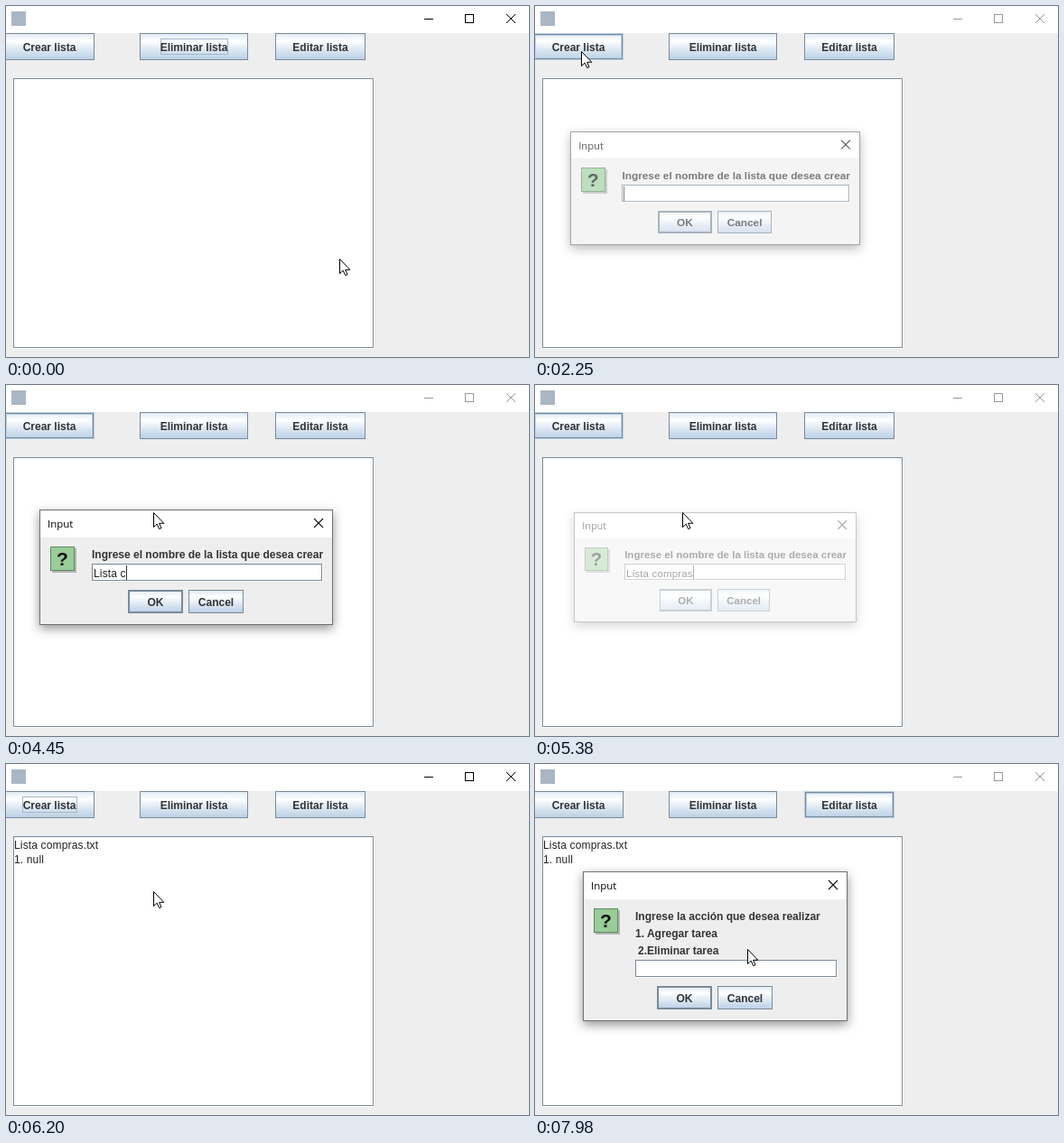
Animation, 579 px wide and 389 px high, one loop 8000 ms. Source, as an HTML page:

```html
<!DOCTYPE html>
<html lang="es">
<head>
<meta charset="utf-8">
<title>Listas</title>
<style>
html, body { margin: 0; width: 100%; height: 100%; overflow: hidden; background: #eee; }
svg { display: block; width: 579px; height: 389px; }
rect, line { shape-rendering: crispEdges; }
text { font: bold 12px "Liberation Sans", Arial, sans-serif; fill: #333; white-space: pre; }
.mid { text-anchor: middle; }
.plain { font-weight: normal; letter-spacing: .15px; fill: #222; }
.title { font: 11.4px "Open Sans", "Noto Sans", sans-serif; fill: #000; }
.face { fill: url(#ocean); }
.edge { fill: none; stroke: #7a8a99; }
.halo { fill: none; stroke: #b8cfe5; }
.ring { fill: none; stroke: #a3b8cc; }
.pressed { fill: #b8cfe5; }
.frame { fill: #eee; stroke: #707070; filter: drop-shadow(0 4px 6px rgba(0,0,0,.42)); }
.white { fill: #fff; }
.cross { fill: none; stroke: #111; stroke-width: 1.1; }

/* One loop is 8 s, so 1% is 80 ms */
.controls, .hard, .dialog { animation: 8s step-end infinite; }
.controls { fill: none; stroke: #000; animation-name: active; }
.hard, .dialog { opacity: 0; }
.dialog { transform-origin: 199.5px 202px; }
#ask-name { animation-name: ask-name; }
#done { animation-name: done; }
#ask-action { animation-name: ask-action; }
#rows { animation-name: rows; }
#over-new { animation-name: over-new; }
#over-edit { animation-name: over-edit; }
#press-new { animation-name: press-new; }
#press-edit { animation-name: press-edit; }
#ring-del { animation-name: ring-del; }
#ring-new { animation-name: ring-new; }
#ring-edit { animation-name: press-edit; }
#caret2 { animation-name: caret2; }
#pointer { animation: pointer 8s ease-in-out infinite; }

@keyframes active {
  0%, 76.625% { stroke: #000; }
  27.25%, 93.625% { stroke: #999; }
}
@keyframes ask-name {
  0% { opacity: 0; }
  27.25% { opacity: .2; transform: scale(.955); }
  28.125% { opacity: .65; transform: scale(.986); }
  29% { opacity: .95; transform: scale(.997); }
  29.875% { opacity: 1; transform: none; }
  67.25% { opacity: .4; transform: scale(.96); }
  68.125% { opacity: 0; }
}
@keyframes done {
  0% { opacity: 0; }
  68.125% { opacity: .15; transform: scale(.95); }
  69% { opacity: .5; transform: scale(.98); }
  69.75% { opacity: .85; transform: scale(.995); }
  70.625% { opacity: .97; transform: scale(.998); }
  71.5% { opacity: 1; transform: none; }
  76.625% { opacity: .4; transform: scale(.96); }
  77.5% { opacity: 0; }
}
@keyframes ask-action {
  0% { opacity: 0; }
  93.625% { opacity: .15; transform: scale(.95); }
  94.5% { opacity: .55; transform: scale(.98); }
  95.375% { opacity: .95; transform: scale(.997); }
  96.25% { opacity: 1; transform: none; }
}
@keyframes rows { 0% { opacity: 0; } 76.625% { opacity: 1; } }
@keyframes over-new { 0%, 76.625% { opacity: 0; } 21.25% { opacity: 1; } }
@keyframes over-edit { 0% { opacity: 0; } 91.2% { opacity: 1; } }
@keyframes press-new { 0%, 27.25% { opacity: 0; } 25.5% { opacity: 1; } }
@keyframes press-edit { 0%, 93.625% { opacity: 0; } 92.75% { opacity: 1; } }
@keyframes ring-del { 0% { opacity: 1; } 25.5% { opacity: 0; } }
@keyframes ring-new { 0%, 27.25%, 92.75% { opacity: 0; } 25.5%, 76.625% { opacity: 1; } }
@keyframes caret2 { 0% { opacity: 1; } 99.6% { opacity: 0; } }
@keyframes pointer {
  0%, 8.9% { transform: translate(369px, 280px); }
  12.5%, 15% { transform: translate(310px, 243px); }
  22%, 29.6% { transform: translate(51px, 50px); }
  33%, 85.6% { transform: translate(163px, 141px); }
  92.4%, 95.9% { transform: translate(332px, 48px); }
  99.6%, 100% { transform: translate(235px, 205px); }
}
</style>
</head>
<body>
<svg viewBox="0 0 579 389">
  <defs>
    <linearGradient id="ocean" x2="0" y2="1">
      <stop stop-color="#dde8f3"/>
      <stop offset=".3" stop-color="#fff"/>
      <stop offset=".6" stop-color="#dde8f3"/>
      <stop offset="1" stop-color="#b8cfe5"/>
    </linearGradient>
    <g id="over">
      <rect class="halo" x=".5" y=".5" width="99" height="29"/>
      <rect class="halo" x="2.5" y="2.5" width="95" height="25"/>
      <rect class="edge" x="1.5" y="1.5" width="97" height="27"/>
    </g>
    <g id="x"><path class="cross" d="M.5 .5l10 10m0-10l-10 10"/></g>
    <g id="question">
      <rect x="2" y="2" width="27" height="27" fill="#b4b4b4"/>
      <rect x=".5" y=".5" width="26" height="26" fill="#99cc99" stroke="#5c8a5c"/>
      <text class="mid" x="13.5" y="21" style="font-size:21px;fill:#111">?</text>
    </g>
    <g id="ok-cancel">
      <rect class="face" width="61" height="26"/>
      <rect class="edge" x="1" y="1" width="59" height="24" stroke-width="2"/>
      <text class="mid" x="30.5" y="18">OK</text>
      <rect class="face" x="67" width="61" height="26"/>
      <rect class="edge" x="67.5" y=".5" width="60" height="25"/>
      <text class="mid" x="97.5" y="18">Cancel</text>
    </g>
  </defs>

  <rect width="579" height="389" fill="#eee"/>
  <rect class="white" width="579" height="30"/>
  <rect x="6" y="6" width="16" height="16" fill="#a9b7c4"/>
  <g class="controls">
    <line x1="463" y1="14.5" x2="473" y2="14.5"/>
    <rect x="508.5" y="9.5" width="9" height="9"/>
    <path d="M554 9l10 10m0-10l-10 10"/>
  </g>

  <g transform="translate(-2 30)">
    <rect class="face" width="100" height="30"/>
    <rect id="press-new" class="hard pressed" width="100" height="30"/>
    <rect class="edge" x=".5" y=".5" width="99" height="29"/>
    <use id="over-new" class="hard" href="#over"/>
    <rect id="ring-new" class="hard ring" x="20.5" y="6.5" width="60" height="17"/>
    <text class="mid" x="50" y="20">Crear lista</text>
  </g>
  <g transform="translate(148 30)">
    <rect class="face" width="120" height="30"/>
    <rect class="edge" x=".5" y=".5" width="119" height="29"/>
    <rect id="ring-del" class="hard ring" x="23.5" y="6.5" width="74" height="17"/>
    <text class="mid" x="60" y="20">Eliminar lista</text>
  </g>
  <g transform="translate(298 30)">
    <rect class="face" width="100" height="30"/>
    <rect id="press-edit" class="hard pressed" width="100" height="30"/>
    <rect class="edge" x=".5" y=".5" width="99" height="29"/>
    <use id="over-edit" class="hard" href="#over"/>
    <rect id="ring-edit" class="hard ring" x="19.5" y="6.5" width="60" height="17"/>
    <text class="mid" x="50" y="20">Editar lista</text>
  </g>

  <rect class="white" x="8" y="80" width="400" height="300"/>
  <rect class="edge" x="8.5" y="80.5" width="398" height="298"/>
  <g id="rows" class="hard">
    <text class="plain" x="9" y="94">Lista compras.txt</text>
    <text class="plain" x="9" y="110">1. null</text>
  </g>

  <g id="ask-name" class="dialog">
    <rect class="frame" x="37.5" y="138.5" width="324" height="127"/>
    <rect class="white" x="38" y="139" width="323" height="30"/>
    <text class="title" x="46" y="158">Input</text>
    <use href="#x" x="340.5" y="147.5"/>
    <use href="#question" x="49" y="179"/>
    <text x="95" y="192">Ingrese el nombre de la lista que desea crear</text>
    <rect class="white" x="95" y="198" width="256" height="20"/>
    <rect class="edge" x="95.5" y="198.5" width="254" height="18"/>
    <text id="typed" class="plain" x="97" y="213"></text>
    <rect id="caret" x="97" y="200" width="1" height="16" fill="#333"/>
    <use href="#ok-cancel" x="135" y="227"/>
  </g>

  <g id="done" class="dialog">
    <rect class="frame" x="29.5" y="141.5" width="338" height="121"/>
    <rect class="white" x="30" y="142" width="337" height="30"/>
    <text class="title" x="38.5" y="161">Message</text>
    <use href="#x" x="346.5" y="150.5"/>
    <circle cx="57" cy="197" r="13" fill="#b4b4b4"/>
    <circle cx="55" cy="195" r="12.7" fill="#ccccff" stroke="#55668c"/>
    <text class="mid" x="55" y="202" style="font-size:20px;fill:#5a6f9c">i</text>
    <text x="87.5" y="203">La lista Lista compras fue creada exitosamente</text>
    <rect class="face" x="179" y="223" width="39" height="26"/>
    <rect class="edge" x="180" y="224" width="37" height="24" stroke-width="2"/>
    <rect class="ring" x="188.5" y="227.5" width="19" height="17"/>
    <text class="mid" x="198.5" y="241">OK</text>
  </g>

  <g id="ask-action" class="dialog">
    <rect class="frame" x="53.5" y="119.5" width="292" height="165"/>
    <rect class="white" x="54" y="120" width="291" height="30"/>
    <text class="title" x="62" y="139">Input</text>
    <use href="#x" x="324.5" y="128.5"/>
    <use href="#question" x="65" y="160"/>
    <text x="111" y="173">Ingrese la acción que desea realizar</text>
    <text x="111" y="192">1. Agregar tarea</text>
    <text x="114" y="211">2.Eliminar tarea</text>
    <rect class="white" x="111" y="217" width="224" height="20"/>
    <rect class="edge" x="111.5" y="217.5" width="222" height="18"/>
    <rect id="caret2" class="hard" x="113" y="219" width="1" height="16" fill="#333"/>
    <use href="#ok-cancel" x="135" y="246"/>
  </g>

  <path id="pointer" d="M.5 .5V16.6L4.2 13.1L6.7 18.6L9 17.6L6.6 12.3H11.8Z" fill="#fff" stroke="#000"/>
</svg>
<script>
const LOOP = 8000;
const WORD = "Lista compras";
// Moment at which each letter is typed, in ms
const KEYS = [3200, 3330, 3400, 3860, 4060, 4190, 4450, 4520, 4650, 4720, 4850, 5050, 5120];
const BLINK_OFF = 2650, BLINK_ON = 3130;
const typed = document.getElementById("typed");
const caret = document.getElementById("caret");
let start, shown = 0;

function draw(now) {
  start ??= now;
  const t = (now - start) % LOOP;
  const count = KEYS.filter(k => k <= t).length;
  if (count !== shown) {
    typed.textContent = WORD.slice(0, count);
    caret.setAttribute("x", 97 + Math.round(count ? typed.getComputedTextLength() : 0));
    shown = count;
  }
  caret.style.opacity = t >= BLINK_OFF && t < BLINK_ON ? 0 : 1;
  requestAnimationFrame(draw);
}
requestAnimationFrame(draw);
</script>
</body>
</html>
```
